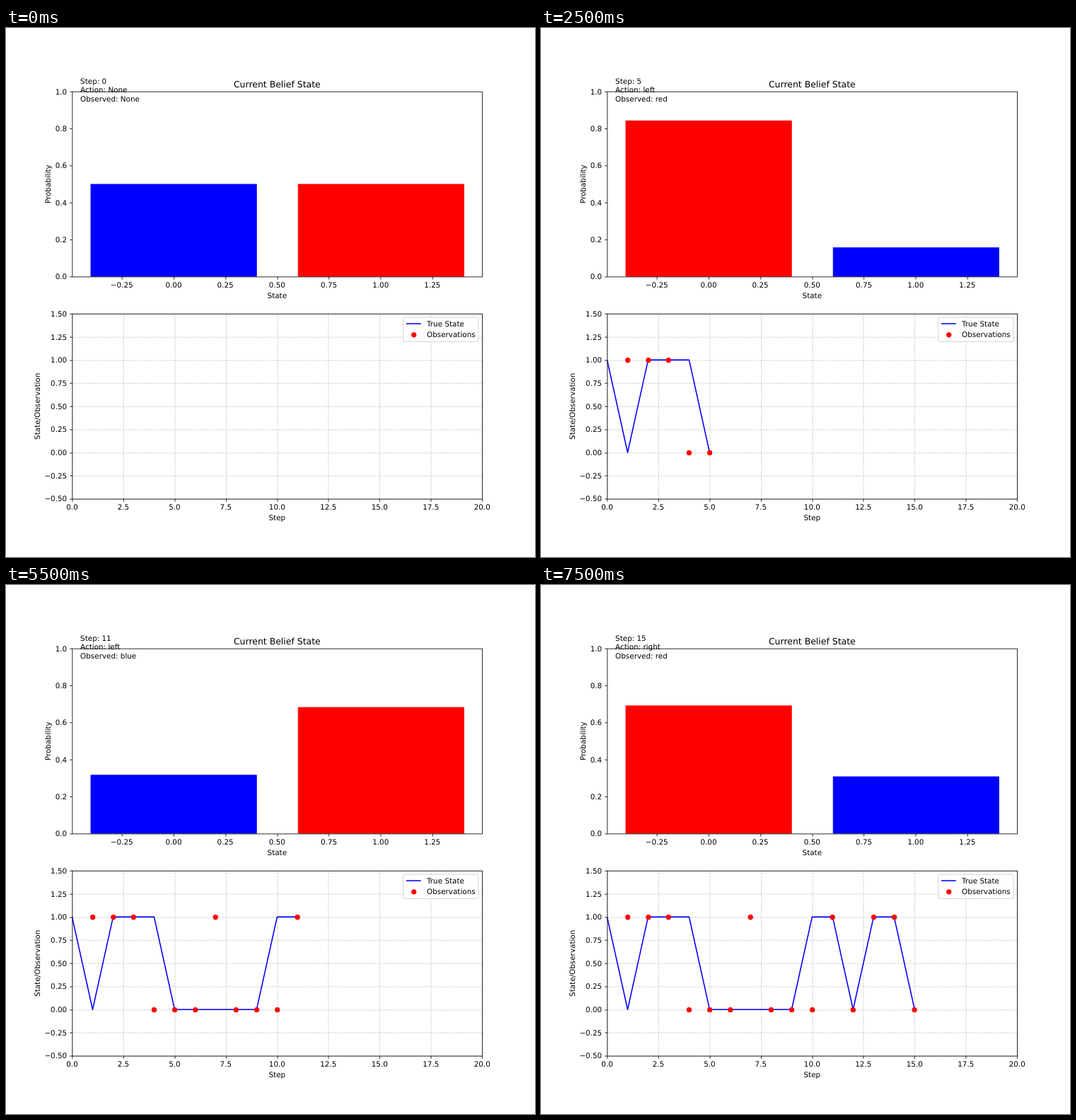
These frames come from a looping animation (748x748 px, 8000 ms). An HTML page:

```html
<!DOCTYPE html>
<html lang="en">
<head>
<meta charset="utf-8">
<title>Belief State</title>
<style>
  html, body { margin: 0; width: 100%; height: 100%; overflow: hidden; background: #fff; }
  svg { display: block; width: 748px; height: 748px; }
  text { font: 13.89px "DejaVu Sans", sans-serif; white-space: pre; text-rendering: geometricPrecision; }
  .title { font-size: 16.67px; }
  .frame { fill: none; stroke: #000; stroke-width: 1.11; }
  .grid { stroke: #b0b0b0; stroke-opacity: .7; stroke-width: 1.11; stroke-dasharray: 4.11 1.78; }
  .curve { fill: none; stroke: #00f; stroke-width: 2.08; stroke-linejoin: round; stroke-linecap: square; }
  .legend { fill: #fff; fill-opacity: .8; stroke: #ccc; stroke-opacity: .8; stroke-width: 1.39; }
</style>
</head>
<body>
<svg id="stage" viewBox="0 0 1000 1000"></svg>
<script>
const STEP_MS = 500;
const STATES = [1, 0, 1, 1, 1, 0, 0, 0, 0, 0, 1, 1, 0, 1, 1, 0];
const SEEN = [null, 1, 1, 1, 0, 0, 0, 1, 0, 0, 0, 1, 0, 1, 1, 0];
const STAY = 0.7, ACCURACY = 0.8;

// The chart is laid out on a 1000-unit canvas and scaled to the stage.
const LEFT = 125, RIGHT = 900, MIDDLE = (LEFT + RIGHT) / 2;
const TOP_PLOT = { top: 120, bottom: 470, x: [-0.49, 1.49], y: [0, 1] };
const LOW_PLOT = { top: 540, bottom: 890, x: [0, 20], y: [-0.5, 1.5] };

const stage = document.getElementById("stage");
const snap = v => Math.floor(v + 0.5) + 0.5;
const px = (plot, v) => LEFT + (v - plot.x[0]) / (plot.x[1] - plot.x[0]) * (RIGHT - LEFT);
const py = (plot, v) => plot.bottom - (v - plot.y[0]) / (plot.y[1] - plot.y[0]) * (plot.bottom - plot.top);
const range = (from, to, by) =>
  Array.from({ length: Math.round((to - from) / by) + 1 }, (_, i) => from + i * by);

function add(tag, attrs, parent = stage) {
  const el = document.createElementNS("http://www.w3.org/2000/svg", tag);
  for (const key in attrs) el.setAttribute(key, attrs[key]);
  parent.appendChild(el);
  return el;
}

function label(content, x, y, anchor = "start", extra = {}) {
  const el = add("text", { x, y, "text-anchor": anchor, ...extra });
  el.textContent = content;
  return el;
}

function line(x1, y1, x2, y2, cls) {
  return add("line", { x1, y1, x2, y2, class: cls });
}

function dot(cx, cy, parent) {
  return add("circle", { cx: Math.round(cx), cy: Math.round(cy), r: 4.86, fill: "#f00" }, parent);
}

function sideLabel(content, x, plot) {
  const y = (plot.top + plot.bottom) / 2;
  label(content, x, y, "middle", { transform: `rotate(-90 ${x} ${y})` });
}

function clippedGroup(plot, id) {
  const clip = add("clipPath", { id });
  add("rect", { x: LEFT, y: plot.top, width: RIGHT - LEFT, height: plot.bottom - plot.top }, clip);
  return add("g", { "clip-path": `url(#${id})` });
}

function drawAxes(plot, xTicks, yTicks, digits) {
  const format = (v, n) => v.toFixed(n).replace("-", "\u2212");
  const left = snap(LEFT), bottom = snap(plot.bottom), top = snap(plot.top);
  for (const v of xTicks) {
    const x = snap(px(plot, v));
    line(x, bottom, x, bottom + 5, "frame");
    label(format(v, digits.x), px(plot, v), plot.bottom + 21, "middle");
  }
  for (const v of yTicks) {
    const y = snap(py(plot, v));
    line(left - 5, y, left, y, "frame");
    label(format(v, digits.y), LEFT - 9.72, Math.round(py(plot, v) + 5.4), "end");
  }
  add("rect", { x: left, y: top, width: snap(RIGHT) - left, height: bottom - top, class: "frame" });
}

// Two-state Bayes filter: chance of state 1 after each observation.
const beliefs = [0.5];
for (const seen of SEEN.slice(1)) {
  const prior = 1 - STAY + (2 * STAY - 1) * beliefs.at(-1);
  const one = prior * (seen ? ACCURACY : 1 - ACCURACY);
  const zero = (1 - prior) * (seen ? 1 - ACCURACY : ACCURACY);
  beliefs.push(one / (one + zero));
}

const barLayer = clippedGroup(TOP_PLOT, "topClip");
const bars = [0, 1].map(state => {
  const x = snap(px(TOP_PLOT, state - 0.4));
  return add("rect", { x, width: snap(px(TOP_PLOT, state + 0.4)) - x, "stroke-width": 1.39 }, barLayer);
});
drawAxes(TOP_PLOT, range(-0.25, 1.25, 0.25), range(0, 1, 0.2), { x: 2, y: 1 });
label("Current Belief State", MIDDLE, 112, "middle", { class: "title" });
label("State", MIDDLE, 511, "middle");
sideLabel("Probability", 84, TOP_PLOT);
const info = [105, 122, 139].map(y => label("", 140.5, y));

const xTicks = range(0, 20, 2.5), yTicks = range(-0.5, 1.5, 0.25);
for (const v of xTicks) {
  const x = snap(px(LOW_PLOT, v));
  line(x, LOW_PLOT.bottom, x, LOW_PLOT.top, "grid");
}
for (const v of yTicks) {
  const y = snap(py(LOW_PLOT, v));
  line(LEFT, y, RIGHT, y, "grid");
}
const plotLayer = clippedGroup(LOW_PLOT, "lowClip");
const curve = add("polyline", { class: "curve" }, plotLayer);
const dots = SEEN.map((seen, i) =>
  seen === null ? null : dot(px(LOW_PLOT, i), py(LOW_PLOT, seen), plotLayer));
drawAxes(LOW_PLOT, xTicks, yTicks, { x: 1, y: 2 });
label("Step", MIDDLE, 931, "middle");
sideLabel("State/Observation", 64, LOW_PLOT);

add("rect", { x: 751, y: 547, width: 142, height: 46, rx: 2.78, class: "legend" });
line(757.6, 559, 783.4, 559, "curve");
dot(771, 580);
label("True State", 795.5, 564);
label("Observations", 795.5, 584.5);

function render(step) {
  const belief = beliefs[step], seen = SEEN[step];
  const base = snap(TOP_PLOT.bottom);
  [1 - belief, belief].forEach((p, state) => {
    const y = snap(py(TOP_PLOT, p));
    const color = (state === 0) === (belief < 0.5) ? "#f00" : "#00f";
    const attrs = { y, height: base - y, fill: color, stroke: color };
    for (const key in attrs) bars[state].setAttribute(key, attrs[key]);
  });

  const action = step === 0 ? "None" : beliefs[step - 1] >= 0.5 ? "right" : "left";
  const observed = seen === null ? "None" : seen ? "blue" : "red";
  [`Step: ${step}`, `Action: ${action}`, `Observed: ${observed}`]
    .forEach((content, i) => { info[i].textContent = content; });

  const points = step === 0 ? [] : STATES.slice(0, step + 1);
  curve.setAttribute("points", points.map((s, i) => `${px(LOW_PLOT, i)},${py(LOW_PLOT, s)}`).join(" "));
  dots.forEach((mark, i) => mark?.setAttribute("visibility", i <= step ? "visible" : "hidden"));
}

const start = performance.now();
let shown = -1;
function tick() {
  const step = Math.floor((performance.now() - start) / STEP_MS) % STATES.length;
  if (step !== shown) render(shown = step);
  requestAnimationFrame(tick);
}
tick();
</script>
</body>
</html>
```
